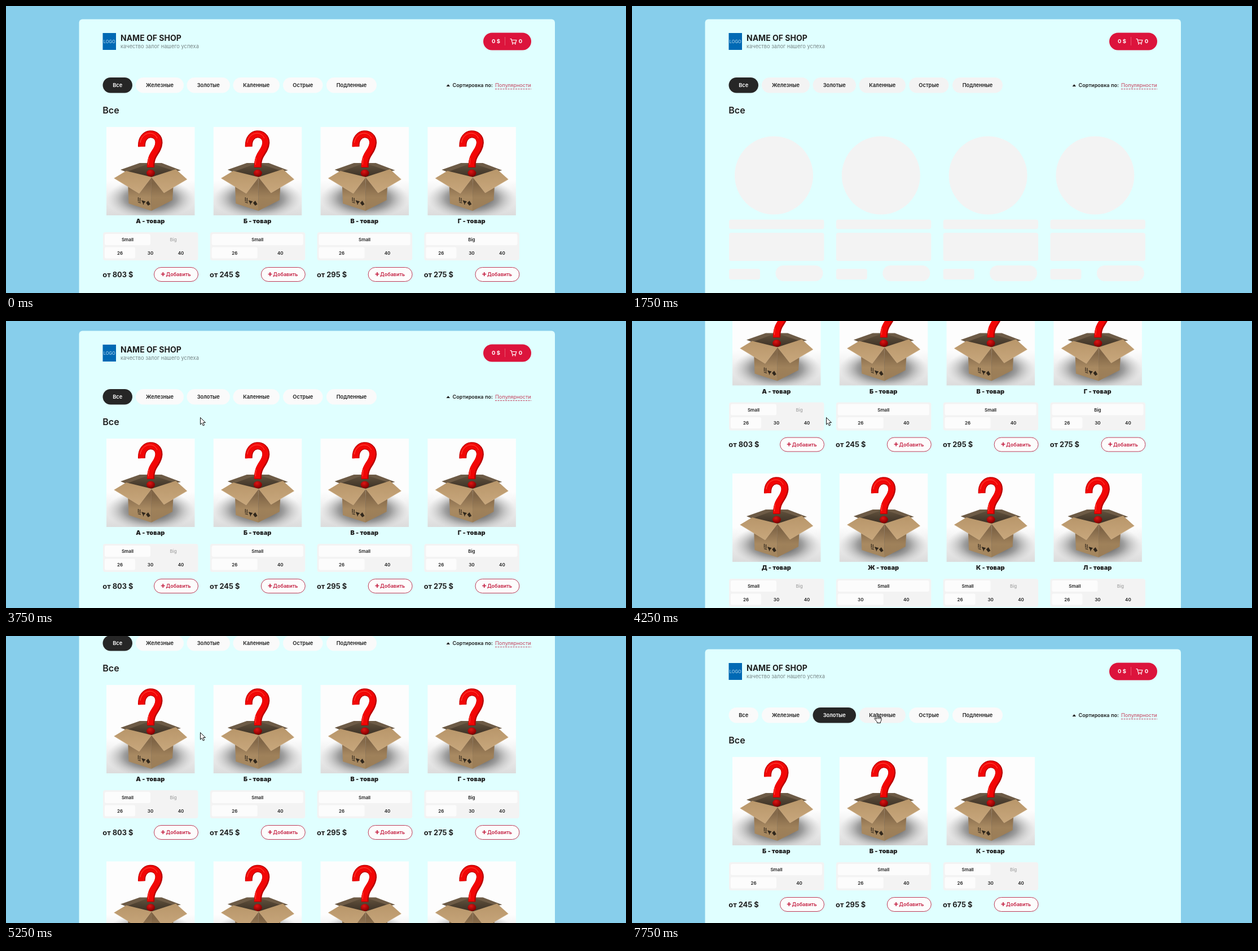
An HTML page that plays this animation: 1099x510 px, repeating every 8000 ms.

```html
<!DOCTYPE html>
<html lang="ru">
<head>
<meta charset="utf-8">
<title>Shop catalogue</title>
<style>
html, body { margin: 0; width: 100%; height: 100%; overflow: hidden; background: #fefefe; }
svg { display: block; width: 1099px; height: 510px; }
text { font-family: Inter, "Open Sans", sans-serif; font-weight: 600; fill: #1f1f1f; }
.mid { text-anchor: middle; }
.bold { font-weight: 700; }
.name { font-weight: 900; font-size: 11px; }
.opt { font-size: 8px; }
.dim { fill: #a3a3a3; font-weight: 500; }
.price { font-size: 12.8px; font-weight: 700; }
.red { fill: #c41f41; font-size: 9px; }
.white { fill: #fff; font-weight: 700; font-size: 9.5px; }
</style>
</head>
<body>
<svg viewBox="0 0 1099 510">
  <defs>
    <radialGradient id="shade" gradientUnits="userSpaceOnUse" cx="0" cy="0" r="1" gradientTransform="translate(256 342) scale(78 36)">
      <stop offset=".3" stop-color="#555" stop-opacity=".95"/>
      <stop offset=".6" stop-color="#777" stop-opacity=".65"/>
      <stop offset="1" stop-color="#bbb" stop-opacity="0"/>
    </radialGradient>
    <linearGradient id="floor" x1="0" y1="0" x2="0" y2="1">
      <stop offset=".6" stop-color="#fdfdfd"/>
      <stop offset="1" stop-color="#dcdcdc"/>
    </linearGradient>
    <linearGradient id="flap" x1="0" y1="0" x2="0" y2="1">
      <stop offset="0" stop-color="#b8966a"/>
      <stop offset="1" stop-color="#c8a77c"/>
    </linearGradient>
    <linearGradient id="side" x1="0" y1="0" x2="0" y2="1">
      <stop offset=".2" stop-color="#84694a"/>
      <stop offset=".6" stop-color="#a98a62"/>
      <stop offset="1" stop-color="#a3855d"/>
    </linearGradient>
    <linearGradient id="inside" x1="0" y1="0" x2="0" y2="1">
      <stop offset="0" stop-color="#66553f"/>
      <stop offset="1" stop-color="#392f24"/>
    </linearGradient>
    <radialGradient id="ball" cx=".4" cy=".3" r=".7">
      <stop offset="0" stop-color="#e01414"/>
      <stop offset="1" stop-color="#7d0000"/>
    </radialGradient>
    <g id="photo">
      <path fill="url(#floor)" d="M178 215h156.5v157h-156.5z"/>
      <path fill="url(#shade)" d="M178 215h156.5v157h-156.5z"/>
      <path fill="url(#inside)" d="M213 294L256 278 301 292 258 305z"/>
      <path fill="#6d5b46" d="M203 291L237 279 256 279 213 295z"/>
      <path fill="#6d5b46" d="M310 292L276 279 256 279 301 294z"/>
      <ellipse cx="256.5" cy="297" rx="7.5" ry="6.5" fill="url(#ball)"/>
      <g fill="none">
        <path stroke="#b80000" stroke-width="13" d="M240.5 250C239 221 271 222 271 243C270 261 256.5 260 256.5 287"/>
        <path stroke="#f20606" stroke-width="10.5" d="M240 250C239 221 271 222 270 243C269 259 255.5 260 255.5 286"/>
        <path stroke="#ff5040" d="M238 243C240 225 262 220 268 235M253.500 270q-1 6 -1 12"/>
      </g>
      <path fill="url(#side)" d="M216 312L258 304 257.5 364 217.5 351z"/>
      <path fill="url(#side)" d="M258 304L297 312 295 345 257.500 364z"/>
      <path fill="#6b5236" opacity=".16" d="M258 304L297 312 295 345 257.5 364z"/>
      <path fill="url(#flap)" d="M191.5 306L213 293 258 304 236 333z"/>
      <path fill="url(#flap)" d="M258 304L301 290 321 308 280 332z"/>
      <path fill="none" stroke="#d2b48b" stroke-width=".6" d="M191.5 306L236 333 258 304 280 332 321 308"/>
      <g fill="#30271c" stroke="#30271c" stroke-width="1.2">
        <path d="M234.500 340v7M237.500 341v7M234 348.500l5 1.500"/>
        <path d="M241 346l5.500 1.500 -3 3.500zM243.500 350v3M249 350l3 -3 3 5 -3 2z"/>
      </g>
    </g>
    <path id="arrow" d="M.5 .5v12.5l2.8 -2.7 2.1 4.7 2.2 -1 -2.1 -4.5h4z" fill="#fff" stroke="#111" stroke-linejoin="round"/>
    <path id="hand" d="M4 11V2Q4 .5 5.300 .5T6.600 2V6.500Q8 5.500 8.800 7Q10.300 6 11 7.700Q13 7 13 9.500V12.500L11.500 15.500V17.500H5.500V15.500L1 10.500Q.2 9 1.500 8.500Q2.500 8.200 4 11zM6.600 6.500v4M8.800 7v3.500M11 7.700v3" fill="#fff" stroke="#111" stroke-linejoin="round"/>
  </defs>
  <g id="site">
    <path fill="#87ceeb" d="M0 0h1099v510h-1099z"/>
    <g id="scroll"></g>
    <use id="cursor"/>
  </g>
</svg>
<script>
const LOOP = 8000, COLUMN = 189.8, ROW = 313.5;
const $ = id => document.getElementById(id);

const text = (x, y, s, cls, extra = '') => `<text x="${x}" y="${y}" class="${cls}" ${extra}>${s}</text>`;
const box = (x, y, w, h, r, fill, extra = '') =>
  `<rect x="${x}" y="${y}" width="${w}" height="${h}" rx="${r}" fill="${fill}" ${extra}/>`;

// letter: [sizes, diameters, price]
const goods = {
  А: ['Small Big', '26 30 40', 803],
  Б: ['Small', '26 40', 245],
  В: ['Small', '26 40', 295],
  Г: ['Big', '26 30 40', 275],
  Д: ['Small Big', '26 30 40', 530],
  Ж: ['Small', '30 40', 390],
  К: ['Small Big', '26 30 40', 675],
  Л: ['Small Big', '26 30 40', 720]
};
const lists = { all: 'АБВГДЖКЛ', iron: 'АГДЛ', gold: 'БВК' };

function options(words, y, dimRest) {
  const items = words.split(' '), w = 162 / items.length;
  return box(175, y, w, 20, 3, '#fcfcfc') + items.map((s, i) =>
    text(175 + w * (i + .5), y + 13, s, 'mid opt' + (dimRest && i ? ' dim' : ''))).join('');
}

function card(letter, i) {
  const [sizes, widths, price] = goods[letter];
  return `<g transform="translate(${i % 4 * COLUMN} ${Math.floor(i / 4) * ROW})">
    <use href="#photo"/>
    ${text(255.8, 386, letter + ' - товар', 'mid name')}
    ${box(172, 402, 168.5, 50, 4, '#f3f3f3')}
    ${options(sizes, 405, true)}${options(widths, 428.5)}
    ${text(171.3, 481.5, `от ${price} $`, 'price')}
    ${box(262.5, 464.5, 78, 25, 12.5, '#fcfcfc', 'stroke="#bd3a56"')}
    <path d="M274.8 476.5h7M278.3 473v7" stroke="#c41f41" stroke-width="1.7"/>
    ${text(283.5, 480, 'Добавить', 'red')}</g>`;
}

const blank = i => `<g transform="translate(${i * COLUMN} 0)" fill="#f3f3f3">
  <circle cx="251.5" cy="301" r="69.5"/>
  ${[[172, 379.5, 168.5, 17, 4], [172, 403, 168.5, 50, 4], [172, 467, 55, 19, 4], [254.5, 461, 84, 28, 14]]
    .map(b => box(...b, '#f3f3f3')).join('')}</g>`;

const tabs = [['Все', 171.5, 52.5], ['Железные', 230, 85], ['Золотые', 320.5, 76.5],
  ['Каленные', 402.5, 82.5], ['Острые', 491, 70.5], ['Подленные', 568, 89]];

$('scroll').innerHTML = box(129.5, 23.5, 843.5, 2000, 6, '#e0ffff') +
  box(171.5, 48, 23.5, 30, 0, '#0069b4') +
  text(183.2, 66, 'LOGO', 'mid', 'style="font-size:7.4px;font-weight:400;fill:#c5e2f2"') +
  text(203, 62, 'NAME OF SHOP', 'bold', 'font-size="14"') +
  text(203, 75, 'качество залог нашего успеха', '', 'style="font-size:9.3px;font-weight:400;fill:#788586"') +
  box(846, 47.5, 85, 31, 15.5, '#dc143c') +
  text(861, 66.3, '0 $', 'white') + text(908.7, 66.3, '0', 'white') +
  `<path d="M884.5 55v15" stroke="#e7546f"/>
   <path d="M893.5 58.5h2.2l2 7.2h5.5l1.5 -5.2h-8" fill="none" stroke="#fff" stroke-width="1.2"/>
   <circle cx="898" cy="67.5" r="1" fill="#fff"/><circle cx="902.7" cy="67.5" r="1" fill="#fff"/>` +
  tabs.map(([s, x, w]) => '<g class="tab">' + box(x, 127, w, 27.5, 13.75, '#fafafa') +
    text(x + w / 2, 144.4, s, 'mid', 'font-size="9.3"') + '</g>').join('') +
  '<path d="M780.5 143l3.3 -4 3.3 4z" fill="#1f1f1f"/>' +
  text(791.5, 144.3, 'Сортировка по:', '', 'font-size="9.15"') +
  text(867, 144.3, 'Популярности', '', 'style="font-size:9.1px;font-weight:400;fill:#c4405c"') +
  '<path d="M867 147.5h64" stroke="#c4405c" stroke-dasharray="3 1.5"/>' +
  text(171.3, 191, 'Все', '', 'font-size="16"') +
  Object.entries(lists).map(([id, s]) => `<g id="${id}">${[...s].map(card).join('')}</g>`).join('') +
  `<g id="skeleton">${[0, 1, 2, 3].map(blank).join('')}</g>`;

// Each step keeps whatever the previous one set.
const steps = [
  { t: 0, shown: true, list: 'all', scroll: 0, tab: 0, from: 0, light: 250, hover: -1, cursor: null },
  { t: 1250, shown: false },
  { t: 1750, shown: true, list: 'skeleton', light: 243 },
  { t: 2250, list: 'all' },
  { t: 3000, cursor: ['arrow', 184.5, 32] },
  { t: 3250, cursor: ['hand', 323, 136] },
  { t: 3500, cursor: ['arrow', 344, 171] },
  { t: 3750, scroll: 6, light: 250 },
  { t: 4000, scroll: 170 },
  { t: 4250, scroll: 257.5 },
  { t: 4500, scroll: 302 },
  { t: 4750, scroll: 322 },
  { t: 5000, scroll: 245 },
  { t: 5250, scroll: 128 },
  { t: 5500, scroll: 0, light: 243 },
  { t: 5750, cursor: ['arrow', 291.5, 158] },
  { t: 6000, cursor: ['hand', 287, 143] },
  { t: 6250, list: 'skeleton', tab: 1 },
  { t: 6500, from: 1, cursor: ['hand', 312, 142] },
  { t: 6750, list: 'iron', cursor: ['hand', 327.5, 142] },
  { t: 7000, cursor: ['hand', 353, 138] },
  { t: 7250, cursor: ['hand', 345, 142] },
  { t: 7500, list: 'gold', tab: 2, light: 250 },
  { t: 7750, from: 2, hover: 3, cursor: ['hand', 429, 137] }
];
steps.forEach((step, i) => steps[i] = { ...steps[i - 1], ...step });

const tabNodes = [...document.querySelectorAll('.tab')];
const gray = v => `rgb(${v},${v},${v})`;
const mix = (a, b, k) => Math.round(a + (b - a) * k);

function draw(s) {
  $('site').style.display = s.shown ? '' : 'none';
  $('scroll').setAttribute('transform', `translate(0 ${-s.scroll})`);
  for (const id of [...Object.keys(lists), 'skeleton']) $(id).style.display = id === s.list ? '' : 'none';
  tabNodes.forEach((node, i) => {
    // While a tab is switching, the old and the new one are both half dark.
    const dark = ((i === s.tab) + (i === s.from)) / 2;
    const light = i === s.hover ? 244 : i === 0 && s.tab ? 250 : s.light;
    node.firstChild.setAttribute('fill', gray(mix(light, 38, dark)));
    node.lastChild.style.fill = gray(mix(31, 255, dark));
  });
  const cursor = $('cursor');
  cursor.style.display = s.cursor ? '' : 'none';
  if (s.cursor) {
    const [shape, x, y] = s.cursor;
    cursor.setAttribute('href', '#' + shape);
    cursor.setAttribute('transform', `translate(${x} ${y})`);
  }
}

let current;
const start = performance.now();
function frame() {
  const t = (performance.now() - start) % LOOP;
  const step = steps.findLast(s => s.t <= t);
  if (step !== current) draw(current = step);
  requestAnimationFrame(frame);
}
frame();
</script>
</body>
</html>
```
